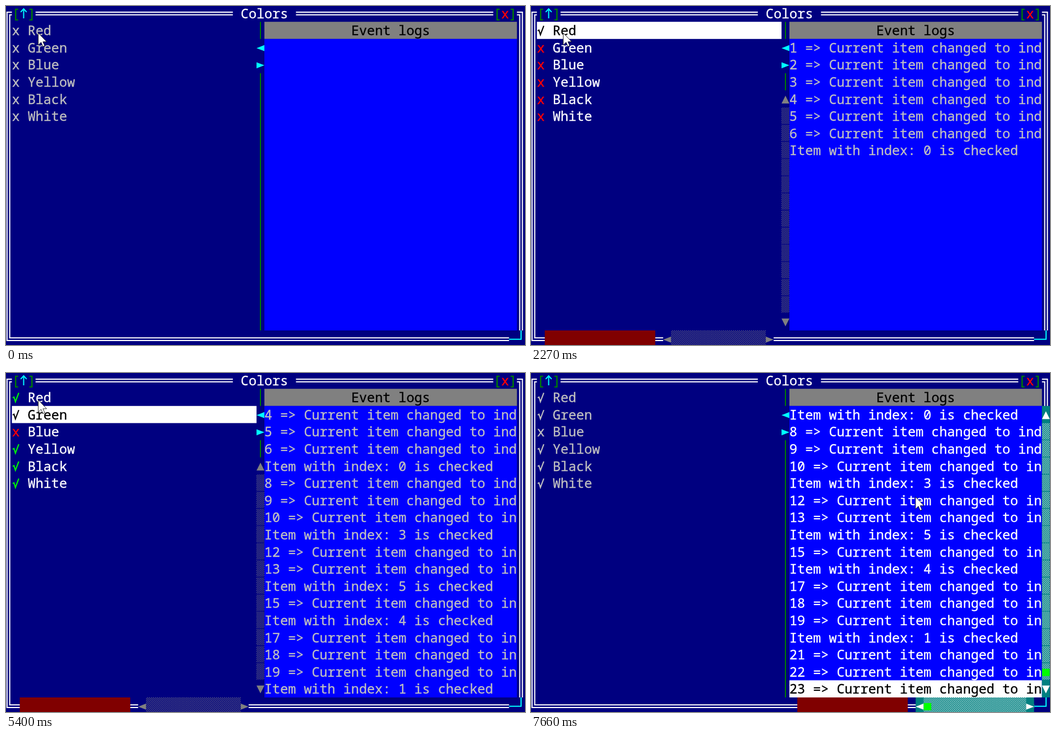
Recreate the animation shown at these times as an HTML page. Size 926 by 605 pixels, loop 8 s.

```html
<!DOCTYPE html>
<html lang="en">
<head>
<meta charset="utf-8">
<title>Colors</title>
<style>
  html, body { margin: 0; width: 100%; height: 100%; overflow: hidden; background: #000080; }
  svg { display: block; width: 926px; height: 605px; }
  text { font: 23.467px "Noto Sans Mono", "DejaVu Sans Mono", monospace; white-space: pre; stroke-width: .35px; }
</style>
</head>
<body>
<svg viewBox="0 0 926 605">
  <defs>
    <pattern id="shade" width="3.52" height="3.52" patternUnits="userSpaceOnUse">
      <path d="M0 0h1.3v1.3h-1.3zM1.76 1.76h1.3v1.3h-1.3z" fill="#808080"/>
    </pattern>
    <pattern id="tealShade" width="3.52" height="3.52" patternUnits="userSpaceOnUse">
      <path d="M0 0h1.3v1.3h-1.3zM1.76 1.76h1.3v1.3h-1.3z" fill="#fff"/>
    </pattern>
  </defs>
  <rect width="926" height="605" fill="#000080"/>
  <g id="screen"></g>
  <path id="cursor" d="M0 0V21.8L5.1 16.8 8.4 24.4 11.6 23 8.4 15.8H15Z" fill="#fff" stroke="#000" stroke-width=".8"/>
</svg>
<script>
const LOOP = 8000, FOCUS_LIST = 70, FOCUS_LOG = 7470;
const CW = 14.08, RH = 30.6, LOG_COL = 32, LOG_ROWS = 17;
const SILVER = '#c0c0c0', GRAY = '#808080', GREEN = '#008000', CYAN = '#00ffff',
      LIME = '#00ff00', RED = '#ff0000', WHITE = '#fff', BLACK = '#000';
const idleBar = { back: '#000080', shade: 'url(#shade)', arrow: GRAY };
const activeBar = { back: '#008080', shade: 'url(#tealShade)', arrow: WHITE };
const colors = ['Red', 'Green', 'Blue', 'Yellow', 'Black', 'White'];

// [time, newly selected item], or [time] when the selected item gets checked
const events = [
  [940, 1], [1070, 2], [1270, 3], [1470, 2], [1670, 1], [1870, 0], [2270],
  [2600, 1], [2800, 2], [2930, 3], [3200], [3400, 4], [3600, 5], [3800],
  [4340, 4], [4600], [4800, 3], [5010, 2], [5130, 1], [5400],
  [5800, 2], [6020, 3], [6150, 4]
];

// Pointer positions, one per step
const MOVE_START = 6660, MOVE_STEP = 68;
const trail = [
  [147, 81], [208, 98], [284, 118], [365, 140], [450, 160], [535, 181],
  [610, 199], [665, 211], [698, 218], [692, 220], [686, 221]
];

const X = c => 10.5 + c * CW;
const Y = r => -2.4 + r * RH;
const baseline = r => Y(r) + 24;
const rect = (x, y, w, h, fill) => `<rect x="${x}" y="${y}" width="${w}" height="${h}" fill="${fill}"/>`;
const cells = (c, r, w, h, fill) => rect(X(c), Y(r), w * CW, h * RH, fill);
const line = (d, color) => `<path d="${d}" fill="none" stroke="${color}" stroke-width="2"/>`;
const put = (c, r, s, ink) =>
  `<text x="${X(c)}" y="${baseline(r)}" fill="${ink}" stroke="${ink}">${s.replace(/>/g, '&gt;')}</text>`;
const tick = (c, r, color) =>
  `<path d="M1.5-8 3.7-9.2 6.3-1 12.3-16.8" transform="translate(${X(c)} ${baseline(r)})" fill="none" stroke="${color}" stroke-width="2.1"/>`;

// Triangle pointing right at 0 degrees
const tri = (c, r, angle, color, half = 5.4) =>
  `<path d="M-7-${half}V${half}L7 0Z" transform="translate(${X(c + .5)} ${Y(r) + 16.4}) rotate(${angle})" fill="${color}"/>`;
const thumb = (c, r) => rect(X(c) + .3, Y(r) + 10, 13.4, 13, LIME);

function border() {
  const gap = 2.4;
  const left = X(-.5) + .8, right = X(64.5) + .3, top = Y(0) + 15.7, bottom = Y(19) + 15.7;
  const rails = [-gap, gap].map(d =>
    `M${X(0)} ${top + d}H${left + d}V${bottom - d}H${X(63)}` +
    `M${X(3)} ${top + d}H${X(28)}M${X(36)} ${top + d}H${X(61)}` +
    `M${X(64)} ${top + d}H${right - d}V${Y(19)}`).join('');
  return line(rails, WHITE) +
    line(`M${X(63)} ${bottom}H${right}V${Y(19)}`, CYAN) +
    put(0, 0, '[', GREEN) + put(2, 0, ']', GREEN) +
    line('M31.5 22V5M26.2 10.8 31.5 5 36.8 10.8', CYAN) +
    put(29, 0, 'Colors', WHITE) +
    put(61, 0, '[', GREEN) + put(62, 0, 'x', RED) + put(63, 0, ']', GREEN);
}

function splitter(listFocused) {
  const x = X(31.5), end = listFocused ? 5 : 19;
  return line(`M${x} ${Y(1)}V${Y(2)}M${x} ${Y(4)}V${Y(end)}`, GREEN) +
    tri(31, 2, 180, CYAN) + tri(31, 3, 0, CYAN);
}

// Search field and horizontal bar on the bottom edge
function bottomBar(field, bar, width, { back, shade, arrow }) {
  return cells(field, 19, 14, 1, '#800000') +
    cells(bar, 19, width, 1, back) +
    cells(bar + 1, 19, width - 2, 1, shade) +
    tri(bar, 19, 180, arrow) + tri(bar + width - 1, 19, 0, arrow);
}

// Vertical bar; each shaded cell leaves a thin seam below it
function sideBar(col, top, { back, shade, arrow }) {
  let out = cells(col, top, 1, 19 - top, back);
  for (let r = top + 1; r < 18; r++) out += rect(X(col), Y(r), CW, RH - 1.2, shade);
  return out + tri(col, top, -90, arrow, 7) + tri(col, 18, 90, arrow, 7);
}

function listView(current, checked, focused) {
  return colors.map((name, i) => {
    const row = i + 1, selected = focused && i === current, on = checked.has(i);
    const ink = selected ? BLACK : focused ? WHITE : SILVER;
    const mark = focused && !selected ? (on ? LIME : RED) : ink;
    return (selected ? cells(0, row, 31, 1, WHITE) : '') +
      (on ? tick(0, row, mark) : put(0, row, 'x', mark)) + put(2, row, name, ink);
  }).join('');
}

function logView(log, focused) {
  const shown = log.slice(-LOG_ROWS);
  return cells(LOG_COL, 1, 32, 1, GRAY) + put(43, 1, 'Event logs', BLACK) +
    cells(LOG_COL, 2, 32, LOG_ROWS, '#0000ff') +
    shown.map((s, i) => {
      const selected = focused && i === shown.length - 1;
      return (selected ? cells(LOG_COL, i + 2, 32, 1, WHITE) : '') +
        put(LOG_COL, i + 2, s.slice(0, 32), selected ? BLACK : focused ? WHITE : SILVER);
    }).join('');
}

function render(count, listFocused, logFocused) {
  let current = 0;
  const checked = new Set(), log = [];
  events.slice(0, count).forEach(([, item], i) => {
    if (item === undefined) {
      checked.add(current);
      log.push(`Item with index: ${current} is checked`);
    } else {
      current = item;
      log.push(`${i + 1} => Current item changed to index: ${item}`);
    }
  });
  let out = border() + logView(log, logFocused);
  if (listFocused) out += sideBar(31, 5, idleBar) + bottomBar(1, 16, 14, idleBar);
  if (logFocused) out += sideBar(64, 2, activeBar) + thumb(64, 17) +
    bottomBar(33, 48, 15, activeBar) + thumb(49, 19);
  return out + splitter(listFocused) + listView(current, checked, listFocused);
}

const screenEl = document.getElementById('screen');
const cursorEl = document.getElementById('cursor');
let lastKey = '';

function frame() {
  const t = performance.now() % LOOP;
  const count = events.filter(e => e[0] <= t).length;
  const logFocused = t >= FOCUS_LOG;
  const listFocused = t >= FOCUS_LIST && !logFocused;
  const key = [count, listFocused, logFocused].join();
  if (key !== lastKey) {
    screenEl.innerHTML = render(count, listFocused, logFocused);
    lastKey = key;
  }
  const step = Math.floor((t - MOVE_START) / MOVE_STEP);
  const [x, y] = step < 0 ? [57.5, 48] : trail[Math.min(step, trail.length - 1)];
  cursorEl.setAttribute('transform', `translate(${x} ${y})`);
  requestAnimationFrame(frame);
}
frame();
</script>
</body>
</html>
```
